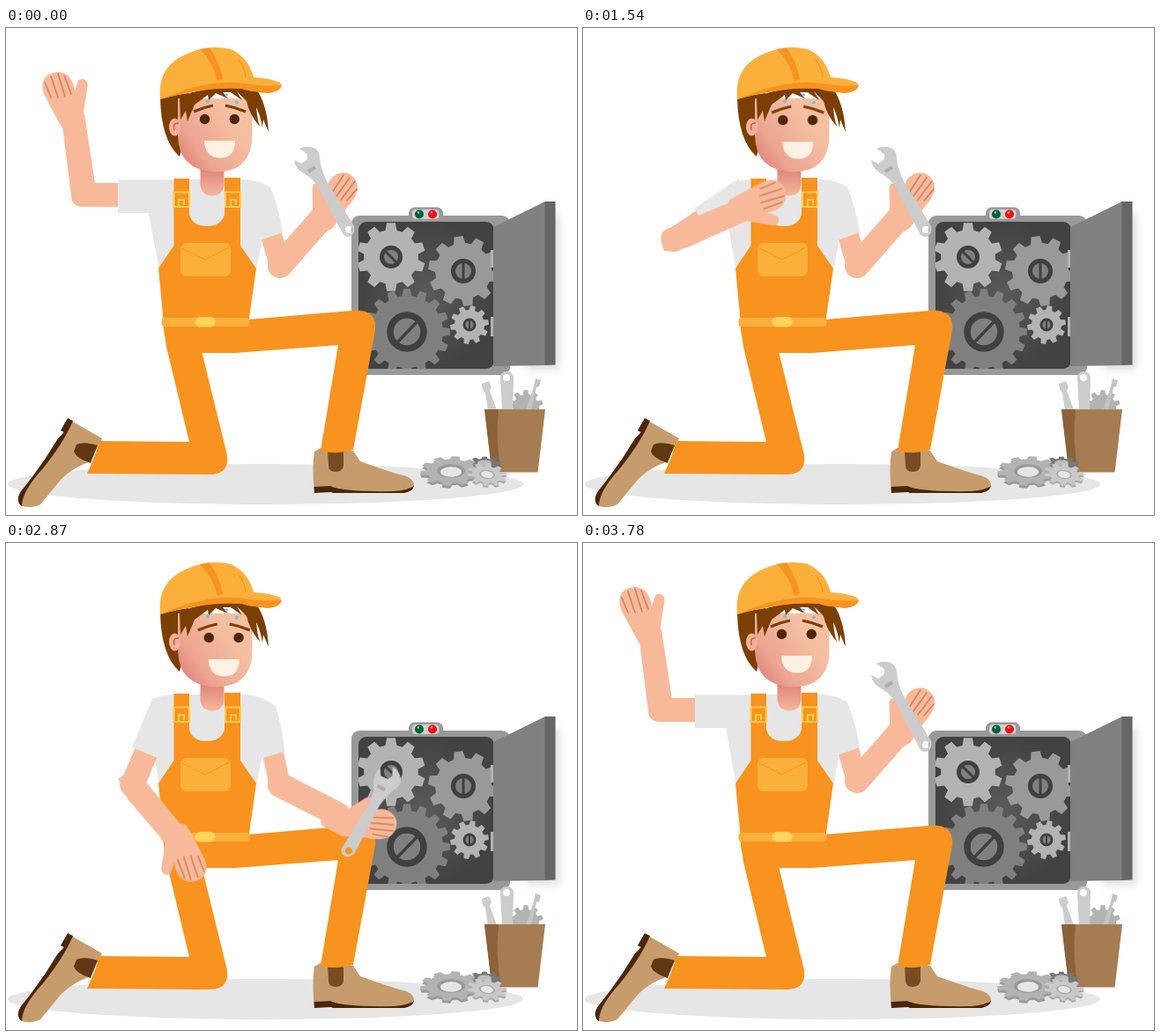
These frames come from a looping animation (648x553 px, 3.85 s). An HTML page:

```html
<!DOCTYPE html>
<html lang="en">
<head>
<meta charset="utf-8">
<title>Mechanic at work</title>
<style>
html, body { margin: 0; width: 100%; height: 100%; overflow: hidden; background: #fff; }
svg { display: block; width: 648px; height: 553px; }

.skin { fill: #f7b999; }
.limb { fill: none; stroke: #f7b999; stroke-linecap: round; }
.crease { fill: none; stroke: #cf8260; stroke-width: 1.6; stroke-linecap: round; }
.shirt { fill: #e6e6e6; }
.cloth { fill: #f7931e; }
.trim { fill: #fbb03b; }
.hair { fill: #7b3f04; }
.leather { fill: #c69c6d; }
.sole { fill: #4a260a; }
.patch { fill: #754c24; }

.l-upper, .l-fore, .l-hand, .l-sleeve, .r-upper, .r-fore, .r-hand, .face {
  animation: 3850ms linear infinite;
}
.l-upper { transform-origin: 180px 190px; animation-name: l-upper; }
.l-fore { transform-origin: 88px 189px; animation-name: l-fore; }
.l-hand { transform-origin: 75px 100px; animation-name: l-hand; }
.l-sleeve { animation-name: l-sleeve; }
.r-upper { transform-origin: 285px 192px; animation-name: r-upper; }
.r-fore { transform-origin: 311px 270px; animation-name: r-fore; }
.r-hand { transform-origin: 366px 207px; animation-name: r-hand; }
.face { animation-name: face; }

/* left arm: two waves, rest on the hip, back up */
@keyframes l-upper {
  0%, 32.73% { transform: rotate(0deg); animation-timing-function: cubic-bezier(.33,.5,.68,.93); }
  52.73%, 83.64% { transform: rotate(-67deg); animation-timing-function: ease-in-out; }
  98.18%, 100% { transform: rotate(0deg); }
}
@keyframes l-fore {
  0%, 16.36% { transform: rotate(0deg); animation-timing-function: cubic-bezier(.39,.575,.565,1); }
  8.18%, 24.55% { transform: rotate(13deg); animation-timing-function: cubic-bezier(.47,0,.745,.715); }
  32.73% { transform: rotate(0deg); animation-timing-function: cubic-bezier(.33,.5,.68,.93); }
  52.73%, 83.64% { transform: rotate(215deg); animation-timing-function: ease-in-out; }
  98.18%, 100% { transform: rotate(0deg); }
}
@keyframes l-hand {
  0%, 32.73% { transform: translate(0px, 0px) rotate(0deg); animation-timing-function: cubic-bezier(.33,.5,.68,.93); }
  52.73%, 83.64% { transform: translate(2px, 11px) rotate(32deg); animation-timing-function: ease-in-out; }
  98.18%, 100% { transform: translate(0px, 0px) rotate(0deg); }
}
@keyframes l-sleeve {
  0%, 32.73% { d: path("M127 172.500L188 172.500L190 205L162 210L127 210Z"); animation-timing-function: cubic-bezier(.33,.5,.68,.93); }
  52.73%, 83.64% { d: path("M127 172.500L186 172L190 200L162 200L127 198Z"); animation-timing-function: ease-in-out; }
  98.18%, 100% { d: path("M127 172.500L188 172.500L190 205L162 210L127 210Z"); }
}

/* right arm: lower the wrench, turn it twice, lift it */
@keyframes r-upper {
  0%, 54.55% { transform: translate(0px, 0px) rotate(0deg); animation-timing-function: ease-in-out; }
  65.45%, 78.18% { transform: translate(5px, 3px) rotate(18deg); animation-timing-function: ease-in-out; }
  71.82%, 84.55% { transform: translate(5px, 3px) rotate(-5deg); animation-timing-function: ease-in-out; }
  98.18%, 100% { transform: translate(0px, 0px) rotate(0deg); }
}
@keyframes r-fore {
  0%, 54.55% { transform: rotate(0deg); animation-timing-function: ease-in-out; }
  65.45%, 78.18% { transform: rotate(53deg); animation-timing-function: ease-in-out; }
  71.82%, 84.55% { transform: rotate(84deg); animation-timing-function: ease-in-out; }
  98.18%, 100% { transform: rotate(0deg); }
}
@keyframes r-hand {
  0%, 54.55% { transform: translate(0px, 0px) rotate(0deg); animation-timing-function: ease-in-out; }
  65.45%, 78.18% { transform: translate(9.5px, -10.5px) rotate(-1deg); animation-timing-function: ease-in-out; }
  71.82%, 84.55% { transform: translate(7.5px, -8px) rotate(-27deg); animation-timing-function: ease-in-out; }
  98.18%, 100% { transform: translate(0px, 0px) rotate(0deg); }
}
@keyframes face {
  0%, 32.73% { transform: translate(0px, 0px); animation-timing-function: ease-in-out; }
  52.73%, 84.55% { transform: translate(4.7px, 4px); animation-timing-function: ease-in-out; }
  98.18%, 100% { transform: translate(0px, 0px); }
}
</style>
</head>
<body>
<svg viewBox="0 0 648 553">
  <defs>
    <linearGradient id="cheek" x1="0" y1=".85" x2=".75" y2=".3">
      <stop offset="0" stop-color="#dd7f78"/>
      <stop offset=".35" stop-color="#eda591"/>
      <stop offset="1" stop-color="#f5c0a2"/>
    </linearGradient>
    <linearGradient id="throat" x1="0" y1="0" x2="0" y2="1">
      <stop offset=".1" stop-color="#dd827a"/>
      <stop offset="1" stop-color="#f5b89b"/>
    </linearGradient>
    <radialGradient id="cavity">
      <stop offset="0" stop-color="#5a5a5a"/>
      <stop offset="1" stop-color="#424242"/>
    </radialGradient>
    <filter id="soft" x="-50%" y="-20%" width="200%" height="140%"><feGaussianBlur stdDeviation="5"/></filter>
    <clipPath id="inside"><rect x="400" y="220" width="154" height="167" rx="9"/></clipPath>
  </defs>

  <ellipse cx="294.500" cy="518" rx="292.500" ry="23" fill="#e6e6e6"/>

  <!-- machine -->
  <rect x="590" y="210" width="38" height="178" fill="#000" opacity=".13" filter="url(#soft)"/>
  <rect x="392" y="213" width="180" height="181" rx="9" fill="#999"/>
  <rect x="457" y="203.500" width="39" height="16" rx="7" fill="#999"/>
  <rect x="461" y="206" width="30.500" height="11" rx="4" fill="#d0d0d0"/>
  <circle cx="469" cy="211.500" r="5" fill="#00603a"/>
  <circle cx="484" cy="211.500" r="5" fill="#f01010"/>
  <circle cx="468" cy="209.500" r="1.300" fill="#8fc7ae"/>
  <circle cx="483" cy="209.500" r="1.300" fill="#ffa0a0"/>
  <rect x="400" y="220" width="154" height="167" rx="9" fill="url(#cavity)"/>
  <g clip-path="url(#inside)" stroke="#404040">
    <g stroke="none">
      <path data-gear="437 260 39 31 10 0" fill="#b3b3b3"/>
      <path data-gear="519 276 40 32 10 -8" fill="#999"/>
      <path data-gear="455 345 49 41 16 0" fill="#808080"/>
      <path data-gear="526 337 22 17 10 10" fill="#b3b3b3"/>
    </g>
    <circle cx="437" cy="260" r="10.500" fill="#808080" stroke-width="5"/>
    <path d="M430 253L444 267" stroke-width="3"/>
    <circle cx="519" cy="276" r="11.500" fill="#808080" stroke-width="5"/>
    <path d="M519 265V287" stroke-width="3"/>
    <circle cx="455" cy="345" r="19" fill="#808080" stroke-width="7.500"/>
    <path d="M444 357L467 333" stroke-width="3.500"/>
    <circle cx="526" cy="337" r="6" fill="#808080" stroke-width="3"/>
    <path d="M526 331V343" stroke-width="2"/>
  </g>
  <path d="M550 252h4v20h-4zM550 328h4v22h-4z" fill="#b3b3b3"/>
  <path d="M553 226L612 197V383L553 384Z" fill="#808080"/>
  <path d="M611.500 197H623.500V382.500L611.500 383Z" fill="#666"/>

  <!-- bucket and loose parts -->
  <path data-gear="590 431 20 15 10 0" fill="#b3b3b3"/>
  <path d="M540 404L548 401L551 408L549 412L557 434H547L544 414L541 411Z" fill="#ccc"/>
  <path d="M561 398Q561 390 568 390Q576 390 576 398L575 434H563Z" fill="#ccc"/>
  <circle cx="568" cy="397" r="4" fill="#fff"/>
  <path d="M601 398L607 400L605 407L602 408L596 434H590L599 407Z" fill="#c4c4c4"/>
  <path d="M543 433H612L603.500 504.500H551.500Z" fill="#a67c52"/>
  <path d="M543 433H559Q555 470 562 504.500H551.500Z" fill="#8c6239"/>
  <g transform="translate(543 494) scale(1 .43)">
    <path data-gear="0 4 21 16 10 0" fill="#777"/>
    <ellipse rx="8" ry="8" fill="#bbb"/>
  </g>
  <g transform="translate(505 503) scale(1 .48)">
    <path data-gear="0 6 35 28 10 9" fill="#999"/>
    <path data-gear="0 0 35 28 10 9" fill="#b3b3b3"/>
    <circle r="16" fill="#999"/>
    <circle cy="2" r="12" fill="#e6e6e6"/>
  </g>
  <g transform="translate(546 507) rotate(8) scale(1 .55)">
    <path data-gear="0 4 23 17 10 0" fill="#aaa"/>
    <path data-gear="0 0 23 17 10 0" fill="#c8c8c8"/>
    <circle r="8" fill="#e6e6e6" stroke="#aaa" stroke-width="2"/>
  </g>

  <!-- legs -->
  <path class="leather" d="M74 446L109 466L94 493Q76 499 62 513L39 541Q30 546 18 543Q13 531 25 517Q53 485 65 459Z"/>
  <path class="sole" d="M70 443L76 446Q66 470 42 500Q18 526 18 543Q10 537 17 526Q40 498 59 466L66 459L62 457Z"/>
  <path class="patch" style="fill:#603813" d="M80 473Q88 469 104 474L96 494Q80 489 77 481Z"/>
  <path class="cloth" d="M178 333L222 367L251 485Q254 507 230 507L92 506Q100 490 106 469L208 470L182 362Z"/>
  <path class="leather" d="M357 477L394 480L402 492Q438 505 454 509Q464 513 463 521L448 527H350Q347 500 350 481Z"/>
  <path class="sole" d="M349.500 521L368 520Q382 527 440 526Q456 525 463 520Q462 526 452 528H371L369 527L350 528Z"/>
  <path class="patch" d="M365 480H383V497Q382 504 374 504Q366 504 366 497Z"/>
  <path class="cloth" d="M275 331L398 320.500Q421 321 419 343L394 479Q376 485 357 480L377 360L260 369H222L180 350L178 333Z"/>

  <!-- torso -->
  <path class="shirt" d="M190 172Q175 173 165 178L162 210L174 275H284L291 240V177Q282 172 266 172Z"/>
  <path d="M220.500 155H247.500V178Q246 190.500 234 190.500Q222 190.500 220.500 178Z" fill="url(#throat)"/>
  <g class="l-upper"><path class="shirt l-sleeve" d="M127 172.500L188 172.500L190 205L162 210L127 210Z"/></g>
  <path class="cloth" d="M190.500 171H208V212Q212 225 228 225Q244 225 248 212V170H266V247L284 273L275 336H179L173 273L190.500 247Z"/>
  <g fill="none" stroke="#ffcb4f" stroke-width="2.200">
    <path d="M190.500 186.500h17.500v16.500h-17.500zM196 203v-8h6v6"/>
    <path d="M249 186.500h17v16.500h-17zM255 203v-8h6v6"/>
  </g>
  <rect class="trim" x="198" y="244" width="57" height="38" rx="7"/>
  <path d="M200 250L226 263L253 249" fill="none" stroke="#f7931e"/>
  <rect class="trim" x="176.500" y="329" width="100" height="10" rx="4"/>
  <rect x="214.500" y="328" width="23" height="11.500" rx="5.500" fill="#ffd35c"/>

  <!-- head -->
  <path class="hair" d="M175 79L207 74L206 112L197 146Q176 128 175 79Z"/>
  <path d="M195 80H279.500V122Q279 163.500 238 163.500Q196 162 195 122Z" fill="url(#cheek)"/>
  <ellipse cx="191.500" cy="112.500" rx="6.500" ry="10" fill="#f2b196"/>
  <path d="M196 108Q189 107 191 116" fill="none" stroke="#b5654f" stroke-width="1.500"/>
  <path class="hair" d="M197 78Q240 62 283 68Q296 85 298 118L292 104L291 113Q288 97 284 90Q285 103 288 112Q276 98 273 83L262 72L268 82L255 73H246L252 80L238 74L230 82L229 76L214 87L206 106L204 94L198 104Z"/>
  <g fill="#79bfd6"><circle cx="229" cy="83.500" r="2"/><circle cx="250" cy="76" r="1.800"/><circle cx="262" cy="84.500" r="2"/></g>
  <g class="face">
    <path d="M213 95Q224 90 235 88M249 88Q260 90 272 95" fill="none" stroke="#7b3f04" stroke-width="3.300"/>
    <circle cx="225.500" cy="103.500" r="5.700" fill="#4d270a"/>
    <circle cx="259.300" cy="103.500" r="5.700" fill="#4d270a"/>
    <path d="M225 128H260Q260 147.500 243 147.500Q226 147.500 225 128Z" fill="#fff1e4"/>
  </g>
  <path class="trim" d="M175 81Q171 43 206 29Q230 18 255 24Q275 33 281 56Q300 57 311 62Q314 66 308 70Q285 75 268 69Q230 65 175 81Z"/>
  <path class="cloth" d="M175 81Q225 59 264 62Q290 67 313 65Q311 73 296 74Q282 73 268 69Q230 66 175 81ZM220 24L231 22.500Q243 40 246 58L240 60Q235 39 220 24Z"/>
  <path d="M264 36Q271 45 272 56" fill="none" stroke="#f7931e" stroke-width="1.200"/>

  <!-- right arm -->
  <g class="r-upper">
    <path class="limb" d="M301 235L311 270" stroke-width="24" style="stroke-linecap:butt"/>
    <path class="shirt" d="M268 172Q290 173 300 181Q309 202 314 232L289 241L272 200Z"/>
    <g class="r-fore">
      <path class="limb" d="M311 270L360 214" stroke-width="28"/>
      <g class="r-hand">
        <path class="skin" d="M347.500 182Q348 175 354 176Q358 180 360 188L368 172Q376 162 388 165Q400 171 399 184Q396 195 386 205L371 227L347 241L334 228L348 206Z"/>
        <path class="crease" d="M370 187L383 167M375 191L390 170M380 195L396 174M387 196L398 183"/>
        <path fill="#ccc" fill-rule="evenodd" d="M333 137Q341 133 349 136Q356 139 356 147Q357 160 364 174L395 225Q397 235 389 237Q383 237 381 231L353 178Q345 168 336 164Q328 158 327 150L335 154L342 149V143ZM385 229a4 4 0 1 0 8 0a4 4 0 1 0 -8 0Z"/>
        <path d="M343 163L351 158" stroke="#adadad" stroke-width="4"/>
      </g>
    </g>
  </g>

  <!-- left arm -->
  <g class="l-upper">
    <path class="skin" d="M88 176H127V203H88Z"/>
    <g class="l-fore">
      <circle class="skin" cx="88" cy="189" r="14"/>
      <path class="skin" d="M64 112L89 98L101 177L98 203H88Q74 203 74 190Z"/>
      <g class="l-hand">
        <path class="skin" d="M64 114L56 100L43 75Q38 60 48 53Q62 46 72 56Q77 63 78 72L81 62Q83 57 88 58Q93 60 92.500 66L88 94L89 112L76 118Z"/>
        <path class="crease" d="M44 62L51 79M51 55L59 79M59 52L67 78M66 54L74 75"/>
      </g>
    </g>
  </g>
</svg>
<script>
// data-gear: centre x, centre y, outer radius, root radius, teeth, turn in degrees
for (const path of document.querySelectorAll('[data-gear]')) {
  const [cx, cy, outer, root, teeth, turn] = path.dataset.gear.split(' ').map(Number);
  const step = 2 * Math.PI / teeth;
  const corners = [[root, -.33], [outer, -.2], [outer, .2], [root, .33]];
  const points = [];
  for (let i = 0; i < teeth; i++) {
    for (const [r, k] of corners) {
      const a = (i + k) * step + (turn - 90) * Math.PI / 180;
      points.push((cx + r * Math.cos(a)).toFixed(1) + ' ' + (cy + r * Math.sin(a)).toFixed(1));
    }
  }
  path.setAttribute('d', 'M' + points.join('L') + 'Z');
}
</script>
</body>
</html>
```
